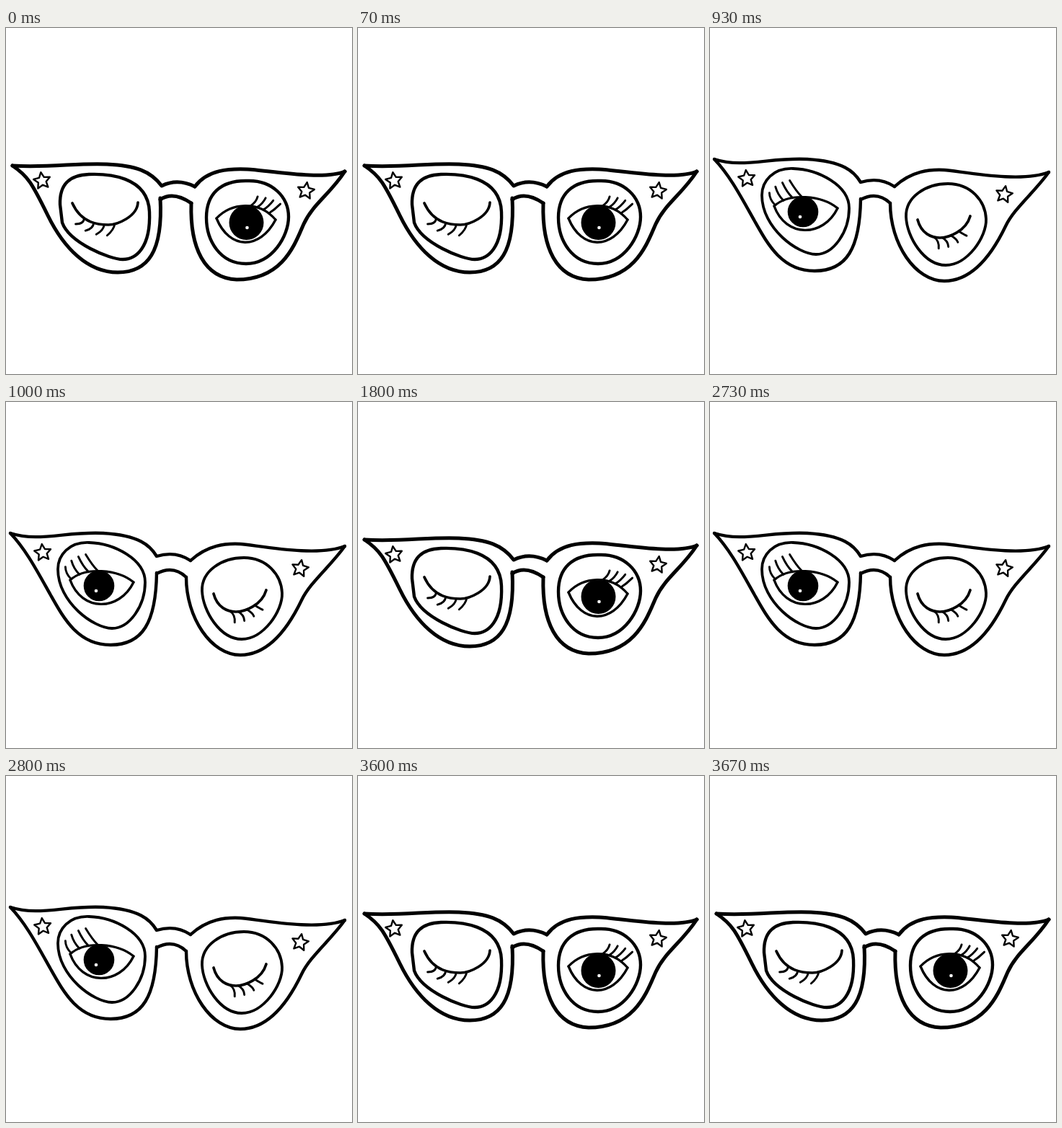
Recreate the animation shown at these times as an HTML page. Size 480 px wide and 480 px high, loop 3990 ms.

```html
<!DOCTYPE html>
<html lang="en">
<head>
<meta charset="utf-8">
<title>Winking glasses</title>
<style>
  html, body { margin: 0; width: 100%; height: 100%; overflow: hidden; background: #fff; }
  svg { display: block; width: 100vw; height: 100vh; }
  path { stroke: #000; fill: none; stroke-linecap: round; stroke-linejoin: round; }
</style>
</head>
<body>
<svg id="stage" viewBox="0 0 480 480"></svg>
<script>
const LOOP = 3990;
const BEAT = 1800;   // one wink of each eye
const WINK = 930;    // the left eye stays shut this long
const LASHES = 4;
const stage = document.getElementById('stage');

function add(parent, tag, attrs) {
  const node = document.createElementNS('http://www.w3.org/2000/svg', tag);
  for (const key in attrs) node.setAttribute(key, attrs[key]);
  return parent.appendChild(node);
}

const stroke = (parent, d, width) => add(parent, 'path', { d, 'stroke-width': width });

function star(parent, cx, cy, tilt) {
  const corners = Array.from({ length: 10 }, (_, i) => {
    const angle = (i * 36 - 90 + tilt) * Math.PI / 180;
    const r = i % 2 ? 5.8 : 12;
    return [cx + r * Math.cos(angle), cy + r * Math.sin(angle)];
  });
  stroke(parent, 'M' + corners.join('L') + 'Z', 2.4);
}

// Evenly spaced lashes rooted on a lid, each a little longer or shorter than the last
function lashes(parent, lid, { from, step, bend, tip, grow }) {
  for (let i = 0; i < LASHES; i++) {
    const root = lid.getPointAtLength(lid.getTotalLength() * (from + step * i));
    const end = tip.map((v, k) => v + grow[k] * i);
    stroke(parent, `M${root.x},${root.y}q${bend} ${end}`, 2.9);
  }
}

function openEye(parent, { upper, lower, iris, radius, glint, fringe }) {
  lashes(parent, stroke(parent, upper, 3.2), fringe);
  stroke(parent, lower, 3.4);
  add(parent, 'circle', { cx: iris[0], cy: iris[1], r: radius });
  add(parent, 'circle', { cx: glint[0], cy: glint[1], r: 2.3, fill: '#fff' });
}

function shutEye(parent, { lid, fringe }) {
  lashes(parent, stroke(parent, lid, 3.7), fringe);
}

function drawPose({ weight, frame, lenses, stars, open, shut }) {
  const group = add(stage, 'g', {});
  frame.forEach(d => stroke(group, d, weight));
  lenses.forEach(d => stroke(group, d, weight - 0.6));
  stars.forEach(place => star(group, ...place));
  openEye(group, open);
  shutEye(group, shut);
  return group;
}

const leftWink = drawPose({
  weight: 5,
  frame: [
    'M9,191C60,194 100,187 140,189S200,198 216,219Q238,208 262,220',
    'M262,220C280,196 310,195 335,196S440,212 470,199',
    'M470,199C450,230 425,245 413,272S385,349 320,349C275,347 255,305 257,243',
    'M257,243Q232,226 214,238',
    'M214,236C218,310 197,339 155,339S80,305 58,260S30,205 9,191'
  ],
  lenses: [
    'M75,245C74,215 90,204 115,203S197,205 199,255S180,321 162,321S88,298 78,270Z',
    'M335,212C370,211 392,235 392,262S369,327 333,327S278,295 278,263S297,211 335,212Z'
  ],
  stars: [[50, 212, -8], [416, 226, 8]],
  open: {
    upper: 'M292,264C312,243 350,238 374,266',
    lower: 'M292,264C310,308 352,308 374,266',
    iris: [333.5, 270], radius: 24, glint: [334.5, 277],
    fringe: { from: 0.56, step: 0.1, bend: [8, -5], tip: [10, -13], grow: [2, 0] }
  },
  shut: {
    lid: 'M92,243C105,272 130,273 142,273S182,262 183,242',
    fringe: { from: 0.23, step: 0.125, bend: [-1, 8], tip: [-12, 8], grow: [0.5, 2.7] }
  }
});

const rightWink = drawPose({
  weight: 4.4,
  frame: [
    'M6,182C45,195 85,179 135,182S200,199 209,214Q235,206 256,220',
    'M256,220C280,198 305,196 325,197S430,216 470,200',
    'M470,200C450,228 422,250 410,275S370,351 325,351C285,351 250,300 250,243',
    'M250,243Q232,226 209,238',
    'M209,237C208,305 190,337 145,337S80,300 62,268S28,205 6,182'
  ],
  lenses: [
    'M115,195C150,196 193,218 193,250S172,314 147,314S72,278 72,232C72,212 88,194 115,195Z',
    'M330,216C362,216 382,240 383,265S357,329 327,329S273,290 272,262S300,216 330,216Z'
  ],
  stars: [[51, 209, -6], [408, 231, 10]],
  open: {
    upper: 'M89,247C110,228 155,232 177,250',
    lower: 'M89,247C105,291 157,291 177,250',
    iris: [129, 255], radius: 21.3, glint: [125, 262],
    fringe: { from: 0.02, step: 0.14, bend: [-8, -8], tip: [-8, -17], grow: [-3, -2] }
  },
  shut: {
    lid: 'M288,266C293,285 307,291 319,291S355,282 361,261',
    fringe: { from: 0.35, step: 0.125, bend: [8, 5], tip: [7, 16], grow: [1.3, -3.3] }
  }
});

function render(time) {
  const leftShut = time % LOOP % BEAT < WINK;
  leftWink.style.display = leftShut ? '' : 'none';
  rightWink.style.display = leftShut ? 'none' : '';
}

const start = performance.now();
function tick() {
  render(performance.now() - start);
  requestAnimationFrame(tick);
}
tick();
</script>
</body>
</html>
```
